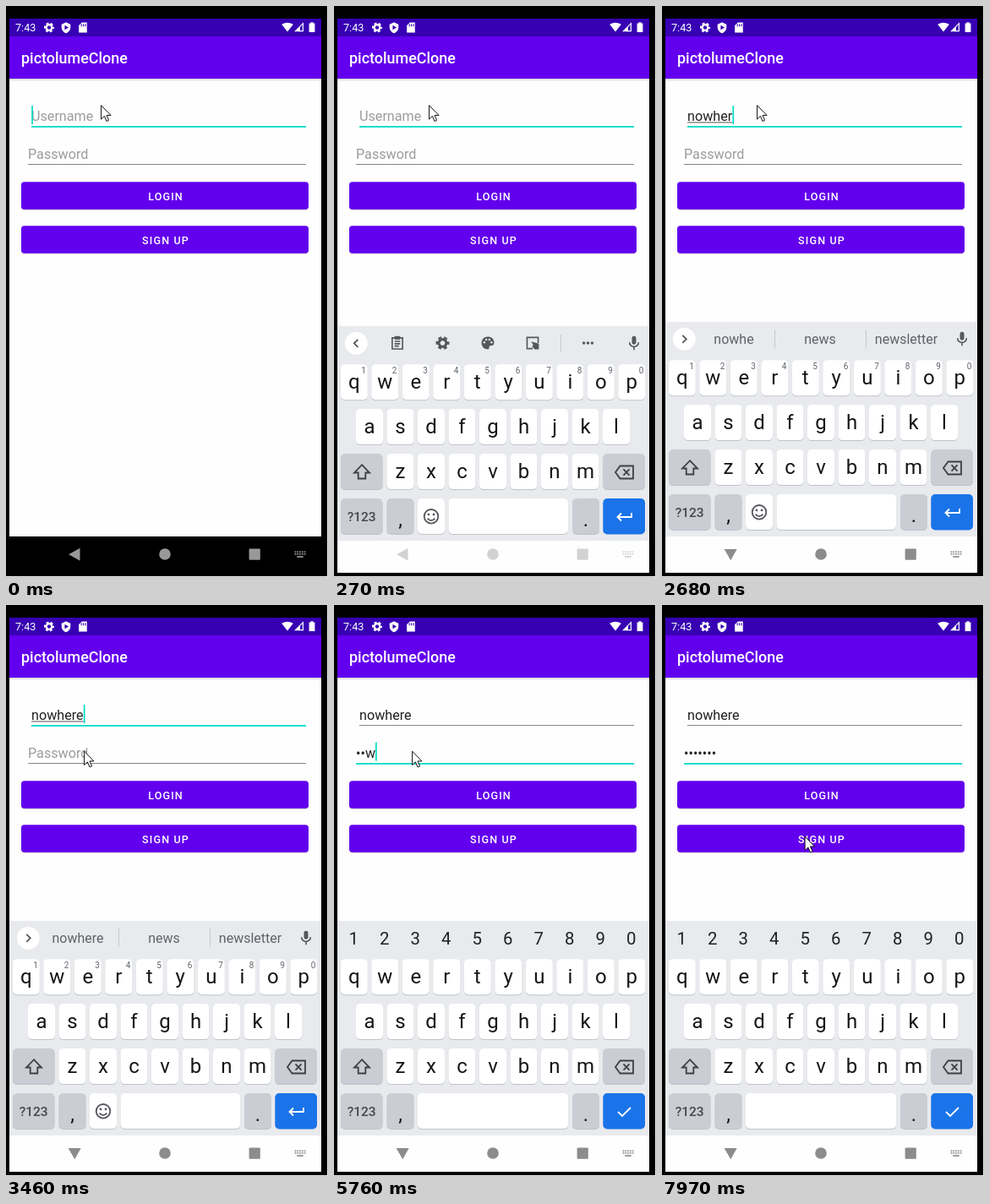
These frames come from a looping animation (381x676 px, 8 s). An HTML page:

```html
<!DOCTYPE html>
<html lang="en">
<head>
<meta charset="utf-8">
<title>Sign-up screen</title>
<style>
  html, body { margin: 0; width: 100%; height: 100%; overflow: hidden; background: #000; }
  svg { display: block; width: 381px; height: 676px; font-family: Roboto, sans-serif; }
  .line { fill: none; stroke: currentColor; stroke-width: 2; }
  .fill { fill: currentColor; }
  .mid { text-anchor: middle; }
  .field { font-size: 16.16px; fill: #212121; white-space: pre; }
  .hint { font-size: 16.16px; fill: #9c9c9c; }
  .label { font-size: 12.57px; font-weight: 500; letter-spacing: 1.12px; fill: #fff; text-anchor: middle; }
  .letter { font-size: 24px; fill: #151515; text-anchor: middle; }
  .word { font-size: 16px; fill: #5f6368; text-anchor: middle; }
</style>
</head>
<body>
<svg id="stage" viewBox="0 0 381 676"></svg>
<script>
const LOOP = 8000;
const PITCH = 36.5;
const GREY = '#54575b', KEY_GREY = '#cacdd3', BOARD = '#e8eaed';
const PURPLE = '#6200ee', TEAL = '#03dac5';
const USER = 'nowhere', PASSWORD = 'unwaver';

// ---- shape helpers ----
const rect = (x, y, w, h, fill, extra = '') =>
  `<rect x="${x}" y="${y}" width="${w}" height="${h}" fill="${fill}" ${extra}/>`;
const text = (x, y, cls, s, extra = '') => `<text x="${x}" y="${y}" class="${cls}" ${extra}>${s}</text>`;
const group = (id, content) => `<g id="${id}">${content}</g>`;
const line = (d, width = 2) => `<path class="line" d="${d}" style="stroke-width:${width}"/>`;
const solid = d => `<path class="fill" d="${d}"/>`;
const dot = (x, y, r, fill = 'currentColor') => `<circle cx="${x}" cy="${y}" r="${r}" fill="${fill}"/>`;
const ring = (r, width = 2, extra = '') =>
  `<circle class="line" r="${r}" style="stroke-width:${width}" ${extra}/>`;
// Icons are drawn on a 24-unit grid around their centre.
const icon = (x, y, scale, color, content) =>
  `<g transform="translate(${x} ${y}) scale(${scale})" color="${color}">${content}</g>`;

const gear = ring(5.4, 3.8) + ring(8.2, 3, 'stroke-dasharray="4.8 3.787" stroke-dashoffset="2.4"');
const clipboard = line('M-7.5 -7.5H7.5V8.5H-7.5Z M-4 -2.5H4 M-4 1H4 M-4 4.5H2') + solid('M-4 -10H4V-5H-4Z');
const mic = solid('M-3 -7a3 3 0 0 1 6 0v6a3 3 0 0 1 -6 0Z') + line('M-6.5 -1a6.5 6.5 0 0 0 13 0 M0 5.5V10');
const more = [-6, 0, 6].map(x => dot(x, 0, 2.1)).join('');
const search = `<circle class="line" cx="-2.5" cy="-2.5" r="5.5"/>` + line('M1.8 1.8L8.5 8.5', 2.4);
const sticker = line('M-6 -8H6Q8 -8 8 -6V2L2 8H-6Q-8 8 -8 6V-6Q-8 -8 -6 -8Z M8 2H4Q2 2 2 4V8 M-4 1Q-1 5 3 1') +
  dot(-3.2, -3, 1.4) + dot(3.2, -3, 1.4);
const palette = solid('M0 -9C-12 -9 -12 9 0 9C3 9 1 5 3 4C5 3 9 5 9 -1C9 -6 5 -9 0 -9Z') +
  [[-5, -1], [-2.3, -5], [2.3, -5], [5.3, -1]].map(([x, y]) => dot(x, y, 1.5, BOARD)).join('');
const floating = line('M8 0V-8H-8V8H0') + solid('M-2 -2L9 1V9H3L-1 5L1 3Z');
const smiley = ring(9) + dot(-3.3, -2.6, 1.5) + dot(3.3, -2.6, 1.5) + line('M-4.8 2.5Q0 8 4.8 2.5');

// ---- screen ----
function statusBar() {
  return rect(4, 15, 369, 21, '#3700b3') +
    text(11, 30.2, '', '7:43', 'font-size="12.6" font-weight="400" fill="#fff"') +
    icon(51, 25.5, .62, '#fff', gear) +
    icon(71, 25.5, .62, '#fff', solid('M0 -10L8.5 -6V0C8.5 5 5 9 0 11C-5 9 -8.5 5 -8.5 0V-6Z') +
      `<path d="M-2.5 -4.5L5 0L-2.5 4.5Z" fill="#3700b3"/>`) +
    icon(91, 25.5, .6, '#fff', solid('M-2 -10H8V10H-8V-4Z') +
      `<path d="M-3 -7V-2M1 -7V-2M5 -7V-2" stroke="#3700b3" stroke-width="1.8"/>`) +
    icon(333, 25, 1, '#fff', solid('M-6.8 -3.2Q0 -7.2 6.8 -3.2L0 5.5Z')) +
    icon(347, 25, 1, '#fff', line('M-4.5 4.6L4.4 -4.4V4.6Z', 1.2) + solid('M-5 5L1 -1V5Z')) +
    icon(362, 25.3, 1, '#fff', solid('M-1.5 -6H1.5V-4.8H3.4V5.8H-3.4V-4.8H-1.5Z'));
}

const button = (y, label, id) =>
  rect(18.5, y + 1, 339, 32.4, 'rgba(0,0,0,.22)', `id="${id}Shadow" rx="3.6"`) +
  rect(18, y, 340, 32.5, PURPLE, 'rx="3.6"') +
  rect(18, y, 340, 32.5, '#fff', `id="${id}Ripple" rx="3.6" opacity="0"`) +
  text(189, y + 21.6, 'label', label);

function form() {
  return rect(4, 86, 369, 542, '#fefefe') +
    rect(4, 86, 369, 1.5, '#d4d4d4') + rect(4, 87.5, 369, 1.5, '#f0f0f0') +
    rect(4, 36, 369, 50, PURPLE) +
    text(18, 68.3, '', 'pictolumeClone', 'font-size="17.96" font-weight="500" fill="#fff"') +
    rect(30, 142, 325, 1, TEAL, 'id="userLine"') +
    rect(26, 187, 329, 1, '#848484', 'id="passLine"') +
    text(30, 136, 'hint', 'Username', 'id="userHint"') +
    text(26, 180.5, 'hint', 'Password', 'id="passHint"') +
    text(30, 136, 'field', '', 'id="user"') +
    text(26, 180.5, 'field', '', 'id="pass"') +
    rect(30, 137.4, 0, 1, '#555', 'id="composing"') +
    rect(0, 0, 1.7, 22, TEAL, 'id="caret"') +
    button(208.3, 'LOGIN', 'login') + button(260.2, 'SIGN UP', 'signUp');
}

// ---- keyboard ----
const key = (x, y, w, fill = '#fff') =>
  rect(x, y + 1, w, 42, '#bfc2c7', 'rx="5"') + rect(x, y, w, 42, fill, 'rx="5"');

const letterRow = (letters, firstCenter, y) => [...letters].map((c, i) => {
  const x = firstCenter + PITCH * i;
  return key(x - 16, y, 32) + text(x, y + 28.7, 'letter', c);
}).join('');

const digits = (make) => [...'1234567890'].map((d, i) => make(d, 23.8 + PITCH * i)).join('');
const tools = list => list.map(([x, content]) => icon(x, 394, .82, GREY, content)).join('');
const divider = (x, y, h) => rect(x, y, 1, h, '#c6c9ce');

function keyboard() {
  const gif = text(181, 398.2, 'mid', 'GIF', `font-size="12" font-weight="900" letter-spacing=".8" fill="${GREY}"`);
  const words = [85, 187, 289].map((x, i) => text(x, 400, 'word', '', `id="word${i}"`)).join('');
  return rect(4, 374, 369, 254, BOARD) + rect(4, 628, 369, 160, '#fefefe') +
    letterRow('qwertyuiop', 23.8, 419.2) + letterRow('asdfghjkl', 42, 472.1) + letterRow('zxcvbnm', 78.5, 525.1) +
    key(8, 525.1, 49.5, KEY_GREY) + key(318.3, 525.1, 49.7, KEY_GREY) +
    icon(33, 546.5, 1, '#3c4043', line('M0 -8.3L9 1H4.3V8H-4.3V1H-9Z', 1.8)) +
    icon(343.5, 547, 1, '#3c4043', line('M-5 -7.5H10.5V7.5H-5L-10.5 0Z M-1 -3.6L6 3.6M6 -3.6L-1 3.6', 1.8)) +
    key(8, 578, 49.5, KEY_GREY) + text(32.7, 605, 'mid', '?123', 'font-size="15.5" font-weight="500" fill="#44474b"') +
    key(62.5, 578, 32, KEY_GREY) + text(78.5, 610.5, 'letter', ',') +
    key(282, 578, 32, KEY_GREY) + text(298, 610.5, 'letter', '.') +
    rect(318.3, 578, 49.7, 42.5, '#1a73e8', 'rx="5"') +
    group('textMode',
      key(99, 578, 32) + key(135.5, 578, 141.5) + icon(115, 599.3, .92, GREY, smiley) +
      icon(343.5, 600, 1, '#fff', line('M8.5 -5V0H-8M-3.5 -4.5L-8 0L-3.5 4.5', 1.9)) +
      digits((d, x) => text(x + 11.2, 430.4, 'mid', d, 'font-size="10" fill="#5f6368"')) +
      dot(26.3, 394.3, 13.4, '#fff') + icon(355, 394, .82, GREY, mic) +
      `<g id="chevron">${icon(26.3, 394.3, 1, GREY, line('M2 -4.5L-2.5 0L2 4.5', 1.8))}</g>` +
      group('moreTools', divider(268, 384, 20) + tools([[300.5, more]])) +
      group('firstTools', tools([[75, clipboard], [128.5, gear], [182, palette], [235, floating]])) +
      group('mainTools', tools([[75.5, search], [128.5, sticker], [235, clipboard]]) + gif) +
      group('suggestions', words + divider(133, 383, 22) + divider(241, 383, 22))) +
    group('passwordMode',
      key(99, 578, 178) + icon(343.5, 600, 1, '#fff', line('M-7.5 0L-2.5 5L7.5 -5', 1.9)) +
      digits((d, x) => text(x - .5, 402.3, 'mid', d, 'font-size="20.4" fill="#202124"')));
}

function navBar() {
  const dots = [-2.5, 0].map(y => [-5.6, -2.8, 0, 2.8, 5.6].map(x =>
    rect(348 + x - .9, 648 + y, 1.8, 1.6, 'currentColor')).join('')).join('');
  return `<g id="nav">` +
    `<path id="back" class="fill" d="M-7 0L6.3 -7.5V7.5Z"/>` +
    dot(188, 649, 6.8) + rect(287.6, 642.6, 13.2, 13.2, 'currentColor', 'rx="1"') +
    dots + rect(344.3, 651.2, 7.4, 1.7, 'currentColor') + `</g>`;
}

const pointer = `<path id="pointer" d="M.6 .6V17L4.4 13.4L7 19.4L9.6 18.3L7 12.4H12Z" fill="#fff" stroke="#111"/>`;

document.getElementById('stage').innerHTML =
  rect(0, 0, 381, 676, '#000') + statusBar() + form() +
  group('keyboard', keyboard()) + navBar() +
  rect(0, 671, 381, 5, '#000') + rect(380, 0, 1, 676, '#e4e4e4') + rect(0, 675, 381, 1, '#e4e4e4') + pointer;

// ---- timeline: [start, value] pairs, each held until the next ----
const userLength = [[0, 0], [1180, 1], [1430, 2], [1570, 3], [2250, 4], [2680, 6], [2920, 7]];
const passLength = [[0, 0], [4400, 1], [4520, 2], [4770, 3], [5910, 4], [6060, 5], [6360, 6], [6480, 7]];
const caretOn = [[0, 1], [120, 0], [670, 1], [4250, 0], [4400, 1], [5200, 0], [5760, 1], [7060, 0], [7450, 1], [7970, 0]];
const boardOffset = [[0, 310], [120, 90], [270, 5], [390, 0]];
const navColor = [[0, '#999'], [120, '#aaa'], [270, '#d2d2d2'], [390, '#c4c4c4'], [670, '#a0a0a0'], [790, '#8c8c8c']];
const backTurn = [[0, 0], [670, -45], [790, -90]];
const pointerAt = [[0, [112, 117]], [3040, [113, 98]], [3160, [113, 127]], [3310, [93, 161]],
  [3460, [92, 172.5]], [6910, [148, 234]], [7060, [168.5, 273.5]]];
const wordsAt = [[0, null], [1300, ['n', 'no', 'not']], [1430, ['no', 'not', 'now']], [1690, ['now', 'new', 'never']],
  [2400, ['nowh', 'news', 'newest']], [2680, ['nowhe', 'news', 'newsletter']],
  [2800, ['nowher', 'news', 'newsletter']], [3040, ['nowhere', 'news', 'newsletter']]];
const ripple = [[0, 0], [7450, .24], [7570, .12], [7720, 0]];
const lift = [[0, 1], [7450, 3], [7570, 1]];

const at = (track, t) => track.findLast(([start]) => start <= t)[1];
const el = id => document.getElementById(id);
const show = (id, on) => el(id).style.display = on ? '' : 'none';
const set = (id, attrs) => Object.entries(attrs).forEach(([k, v]) => el(id).setAttribute(k, v));

function setLine(id, focused) {
  set(id, { height: focused ? 1.8 : 1, fill: focused ? TEAL : '#848484' });
}

function draw(t) {
  const onPassword = t >= 3580, passwordMode = t >= 3860;

  const typed = at(passLength, t), hidden = t >= 7970 ? typed : Math.max(0, typed - 1);
  el('user').textContent = USER.slice(0, at(userLength, t));
  el('pass').textContent = '•'.repeat(hidden) + PASSWORD.slice(hidden, typed);
  show('userHint', t < 1180);
  show('passHint', !typed);
  setLine('userLine', !onPassword);
  setLine('passLine', onPassword);

  const userWidth = el('user').getComputedTextLength();
  set('composing', { width: t >= 1300 && !onPassword ? userWidth : 0 });
  set('caret', onPassword
    ? { x: 26 + el('pass').getComputedTextLength(), y: 162.5 }
    : { x: 30.2 + userWidth, y: 118 });
  show('caret', at(caretOn, t));

  set('keyboard', { transform: `translate(0 ${at(boardOffset, t)})` });
  const words = at(wordsAt, t);
  if (words) words.forEach((w, i) => el('word' + i).textContent = w);
  show('textMode', !passwordMode);
  show('passwordMode', passwordMode);
  show('suggestions', words);
  show('moreTools', !words);
  show('firstTools', t < 790);
  show('mainTools', t >= 790 && !words);
  set('chevron', { transform: words ? 'translate(52.6 0) scale(-1 1)' : '' });

  set('nav', { color: at(navColor, t) });
  set('back', { transform: `translate(81.2 649.2) rotate(${at(backTurn, t)})` });
  set('signUpRipple', { opacity: at(ripple, t) });
  set('signUpShadow', { y: 260.2 + at(lift, t) });
  set('pointer', { transform: `translate(${at(pointerAt, t)})` });
}

const start = performance.now();
function tick() {
  draw((performance.now() - start) % LOOP);
  requestAnimationFrame(tick);
}
tick();
</script>
</body>
</html>
```
